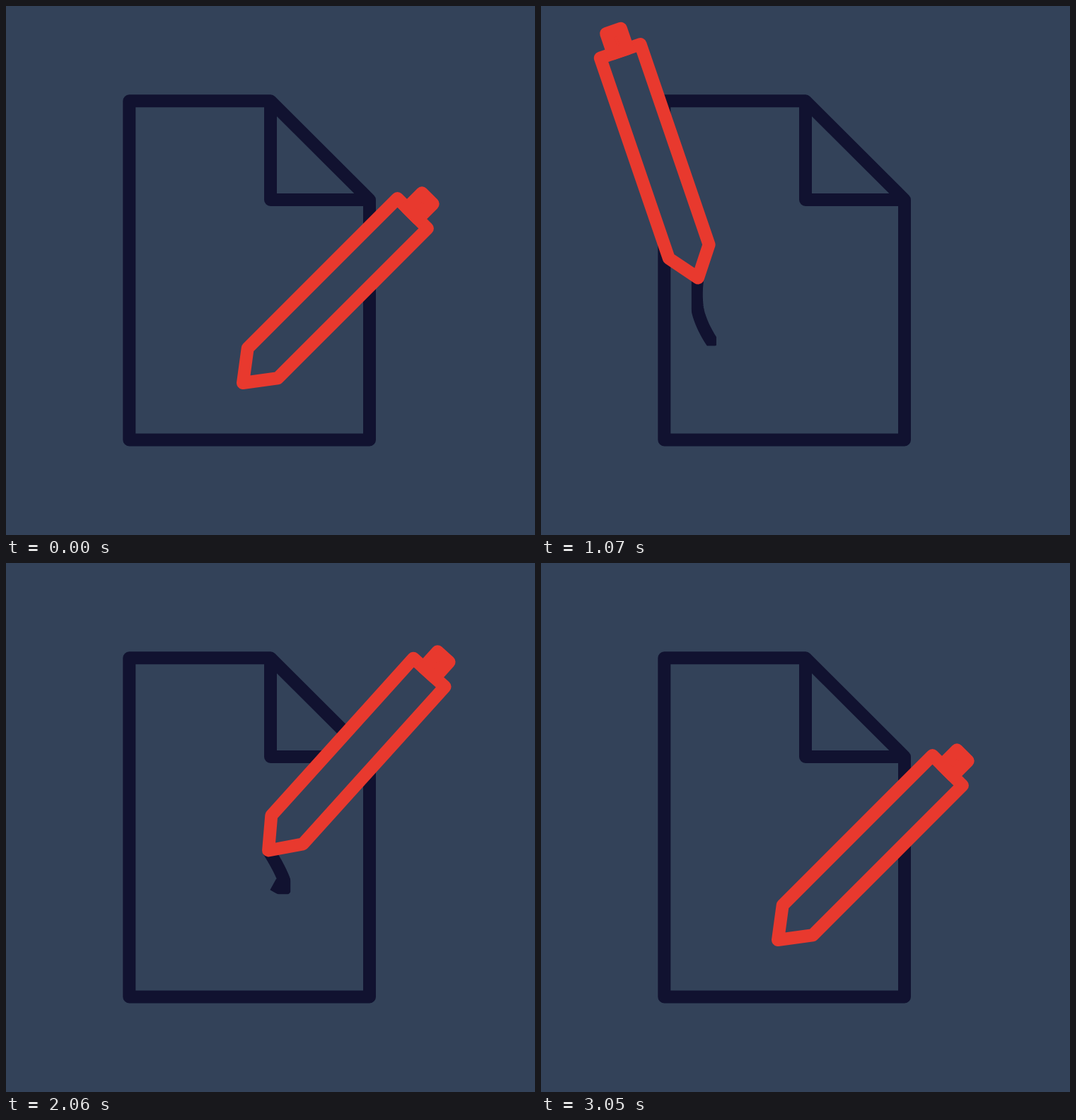
Recreate the animation shown at these times as an HTML page. Size 748 by 748 pixels, loop 3140 ms.

```html
<!DOCTYPE html>
<html lang="en">
<head>
<meta charset="utf-8">
<title>Writing pen</title>
<style>
  html, body { margin: 0; width: 100%; height: 100%; overflow: hidden; background: #334259; }
  svg { display: block; width: 100%; height: 100%; }
  path { stroke: #111230; stroke-width: 18; stroke-linejoin: round; fill: none; }
  #pen path { stroke: #e8392e; }
  #pen .body { fill: #334259; }
  #pen .cap { fill: #e8392e; }
</style>
</head>
<body>
<svg viewBox="0 0 748 748">
  <clipPath id="crop"><rect id="box"/></clipPath>
  <path d="M174.300 134.300H374L514 274V613.400H174.300ZM374 134.300V274H514"/>
  <g clip-path="url(#crop)"><path id="ink"/></g>
  <g id="pen">
    <path class="body" d="M0 0L30 -39.500V-339H-30V-39.500Z"/>
    <path class="cap" d="M-11 -339V-369H11V-339Z"/>
  </g>
</svg>
<script>
const LOOP = 3140, START = 530, STEP = 30, END = 3050;
const INK = 95, GROW = 550, SHRINK = 1360, PAD = 7;

// Turning points of the stroke: time, tip x, tip y, tilt in degrees
const keys = [
  [START - STEP, 335, 533, 45],
  [830, 287, 521, 16],
  [930, 244, 478, 1.5],
  [1000, 222, 432, -9],
  [1070, 222, 384.5, -18.9],
  [1250, 245, 376, -30.5],
  [1430, 325, 418, -35.2],
  [1760, 394, 461, 9.3],
  [2120, 362, 393, 48],
  [2240, 322, 360, 56],
  [2390, 330, 392, 60.7],
  [2660, 322, 488, 67.5],
  [END, 335, 533, 45]
];

const [pen, ink, box] = ['pen', 'ink', 'box'].map(id => document.getElementById(id));

function slope(i, c) {
  const a = keys[i - 1], b = keys[i + 1];
  return a && b ? (b[c] - a[c]) / (b[0] - a[0]) : 0;
}

// Hermite spline through the turning points
function pose(t) {
  t = Math.min(END, Math.max(keys[0][0], t));
  let i = 0;
  while (t > keys[i + 1][0]) i++;
  const a = keys[i], b = keys[i + 1], d = b[0] - a[0];
  const u = (t - a[0]) / d, v = 1 - u;
  return [1, 2, 3].map(c =>
    v * v * (1 + 2 * u) * a[c] + u * u * (3 - 2 * u) * b[c] +
    d * u * v * (v * slope(i, c) - u * slope(i + 1, c)));
}

// Points from the tip backwards along its path, up to the given length
function trail(t, length) {
  const pts = [pose(t)];
  while (length > 0 && t > keys[0][0]) {
    t -= 4;
    const p = pts[pts.length - 1], q = pose(t);
    length -= Math.hypot(q[0] - p[0], q[1] - p[1]);
    pts.push(q);
  }
  return pts;
}

// Crop the line to its own bounds, which leaves its tail square
function drawInk(pts) {
  const [x, y] = [0, 1].map(c => Math.min(...pts.map(p => p[c])) - PAD);
  const [r, b] = [0, 1].map(c => Math.max(...pts.map(p => p[c])) + PAD);
  Object.entries({ x, y, width: r - x, height: b - y })
    .forEach(([name, value]) => box.setAttribute(name, value));

  const [p, e] = pts.slice(-2);
  const k = 9 / (Math.hypot(e[0] - p[0], e[1] - p[1]) || 1);
  const end = [0, 1].map(c => e[c] + (e[c] - p[c]) * k);
  ink.setAttribute('d', 'M' + [...pts, end].map(q => q[0] + ' ' + q[1]).join('L'));
}

function draw(now) {
  const ms = now % LOOP;
  const t = ms < START ? 0 : START + Math.floor((ms - START) / STEP) * STEP;
  const [x, y, tilt] = pose(t);
  pen.setAttribute('transform', `translate(${x} ${y}) rotate(${tilt})`);

  const length = INK * Math.min(1, (t - START) / GROW, (END - t) / SHRINK);
  if (length > 0) drawInk(trail(t, length));
  else ink.setAttribute('d', '');
}

const begin = performance.now();
function tick() {
  draw(performance.now() - begin);
  requestAnimationFrame(tick);
}
tick();
</script>
</body>
</html>
```
